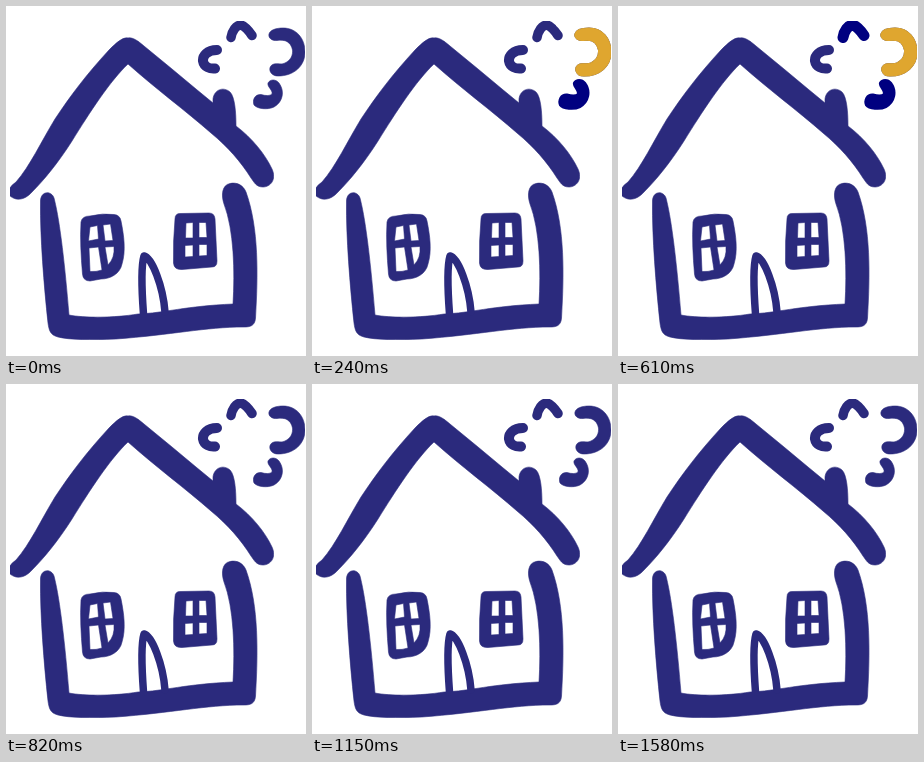
Write an HTML page that moves like this. It is 300 px wide and 350 px high and loops after 1.81 s.

```html
<!DOCTYPE html>
<html lang="en">
<head>
<meta charset="utf-8">
<title>House with smoke</title>
<style>
  html, body { margin: 0; width: 100%; height: 100%; overflow: hidden; background: #fff; }
  svg { display: block; width: 300px; height: 350px; }
  .line { fill: none; stroke: var(--ink); stroke-linecap: round; stroke-linejoin: round; }
  .solid { fill: var(--ink); fill-rule: evenodd; stroke: var(--ink); stroke-width: .6; stroke-linejoin: round; }
  .part { --ink: #2b2a7d; filter: blur(.6px); }
  .part.navy { --ink: #000080; filter: blur(.3px); }
  .part.gold { --ink: #dfa62f; filter: blur(.3px) drop-shadow(.8px .8px .7px #4b4870); }
  .part.raised { transform: translate(-1px, -1px); filter: blur(.4px) drop-shadow(.8px .8px .6px #77738c); }
  .puff path { stroke-width: var(--w); }
  .puff.navy path { stroke-width: calc(var(--w) + 1.5px); }
  .puff.gold path { stroke-width: calc(var(--w) + .5px); }
</style>
</head>
<body>
<svg viewBox="0 0 300 350">
  <clipPath id="area"><rect x="4" y="15" width="295" height="320"/></clipPath>
  <g clip-path="url(#area)">
    <g id="house" class="part">
      <path class="solid" d="M3 184 Q5 179 10 176 C24 160 35 136 49 113 C65 89 80 69 103 44
        C111 36 117 31 122 32 C127 31 132 35 138 40 L166 63 L190 83 L207 97
        L207 93 C208 84 217 80 224 86 C229 91 230 107 230 120
        C246 132 259 148 266 163 C271 174 264 181 257 181 C250 181 248 176 245 172
        C235 156 222 141 205 127 C180 105 150 83 122 58 C104 75 84 106 66 135
        C52 157 38 174 26 186 C18 195 9 195 3 189 Z"/>
      <path class="solid" d="M34.500 196 C34 184 47 184 48.500 194 C54 216 59 260 63 309
        C78 312 108 312 132 308 C158 307 180 300 227 298 C229 266 228 224 218 198
        C215 189 216 179 224 177.500 C231 176 237 179 240 186 C253 222 252 270 249.500 312
        C249 320 244 321 238 321 C200 321 165 329 110 333 C85 334 64 334 52 331
        C44 329 43 324 42 317 C38 280 34 230 34.500 196 Z"/>
      <path class="line" stroke-width="7.500" d="M137.500 308 C136 288 134.500 262 138 250 C146 252 157 280 159 306"/>
    </g>
    <g id="windows" class="part">
      <path class="solid" d="M75 216 Q76 210 84 210 Q97 207 108 208.500 Q114 209 115 215
        C118 230 120 245 116 258 C114 268 104 273 95 273 L84 275 Q77 275 76.500 268 C75 250 74 232 75 216 Z
        M84 221 L91.500 219.500 L92.500 233 L82.500 235 Z M97 219 L104.500 218 L107 234.500 L99 235 Z
        M83 242 L92.500 241 L96 264 Q90 266 84 265.500 Z M99 241 L108 240.500 Q109 252 102 259 Z"/>
      <path class="solid" d="M169 213 Q169 207 175 207.500 L203 207 Q208.500 207 209 213 L211 255
        Q211 261 206 261 L176 263.500 Q168 264 167.500 257 Q167 235 169 213 Z
        M180 217 L187 216.500 V232 H179.500 Z M193 216.500 H200 L201 231.500 H193 Z
        M179 239.500 L187 239 V250.500 L179 251 Z M193 238.500 H201 V249.500 L193 250 Z"/>
    </g>
    <g id="big" class="part puff" style="--w:.6px"><path class="solid" d="M263 28 C264 24 270 22 277 22
      C290 22 299 32 299 46 C299 60 288 70 272 70 C263 70 261 60 268 58 C272 57 275 59 279 57
      C285 54 287 49 286.500 44 C285 36 279 33 271 34.500 C266 35 262 32 263 28 Z"/></g>
    <g id="low" class="part puff" style="--w:.6px"><path class="solid" d="M262 77 C264 73 270 73 273 77
      C279 85 277 96 268 101 C262 104 251 103 248 99 C246 94 249 88 255 88.500
      C260 90 264 90 266 88 C267 84 261 81 262 77 Z"/></g>
    <g id="top" class="part puff" style="--w:9.500px"><path class="line" d="M225 31.500 C226 25 230 19 235 19 C238 20 243 25 246 29.500"/></g>
    <g id="left" class="part puff" style="--w:10px"><path class="line" d="M211 44 C201 44 196.500 50 197 55 C198 61 204 63 209 62.500"/></g>
  </g>
</svg>
<script>
  const LOOP = 1810;
  const plain = {};
  const one = { big: 'gold' };
  const two = { ...one, low: 'navy' };
  const three = { ...two, top: 'navy' };
  const four = { ...three, left: 'navy' };
  const lit = { big: 'gold', low: 'gold', top: 'gold', left: 'gold', windows: 'gold', house: 'raised' };

  // Puffs light one by one, go out in reverse, then everything flashes.
  const steps = [
    [0, plain], [170, one], [240, two], [310, three], [380, four],
    [610, three], [680, two], [750, one], [820, plain],
    [850, lit], [1150, plain], [1350, lit], [1580, plain]
  ];
  const parts = [...document.querySelectorAll('.part')];
  const start = performance.now();
  let shown;

  function show(state) {
    if (state === shown) return;
    shown = state;
    for (const part of parts) {
      part.classList.remove('gold', 'navy', 'raised');
      if (state[part.id]) part.classList.add(state[part.id]);
    }
  }

  function tick() {
    const time = (performance.now() - start) % LOOP;
    show(steps.findLast(([at]) => at <= time)[1]);
    requestAnimationFrame(tick);
  }
  tick();
</script>
</body>
</html>
```
